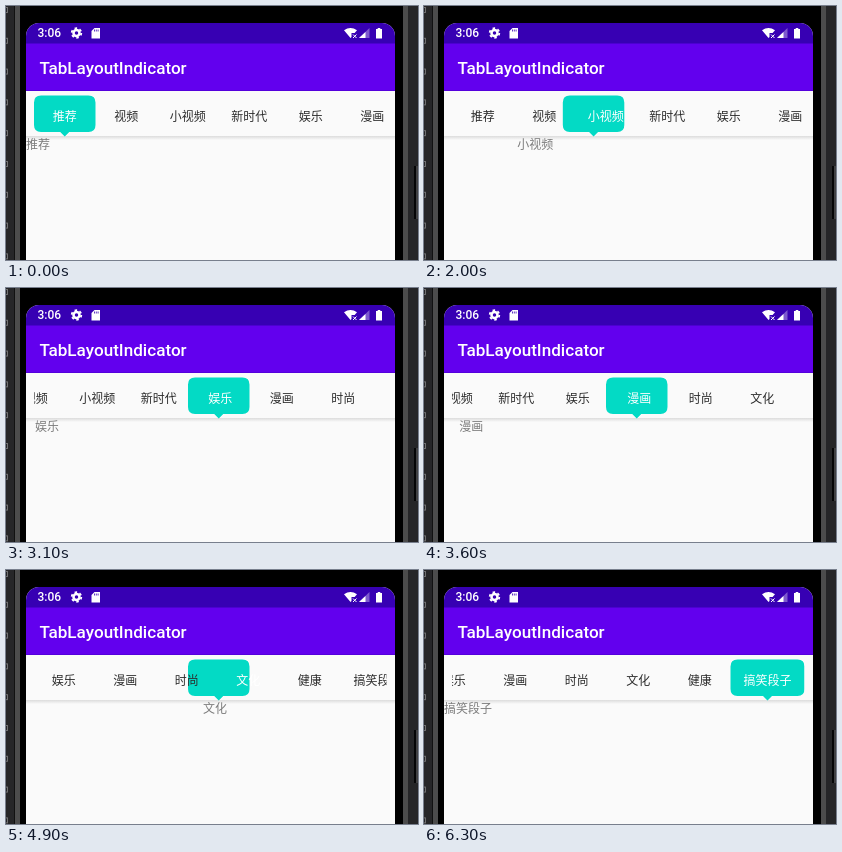
An HTML page for the animation above (7.4 s loop, 412 by 254 pixels).

```html
<!DOCTYPE html>
<html lang="zh-CN">
<head>
<meta charset="utf-8">
<style>
html, body { margin: 0; width: 100%; height: 100%; overflow: hidden; background: #262628; }
svg { display: block; width: 412px; height: 254px; }
text { font: 12px "Noto Sans CJK SC", "Noto Sans CJK", sans-serif; }
.latin { font-family: Roboto, sans-serif; font-weight: 500; fill: #fff; }
.title { font-size: 17.1px; }
#tabs text { text-anchor: middle; }
#pages text { fill: #7c7c7c; }
</style>
</head>
<body>
<svg viewBox="0 0 412 254">
  <defs>
    <clipPath id="screen"><path d="M20 254V30a13 13 0 0 1 13-13H376a13 13 0 0 1 13 13V254z"/></clipPath>
    <clipPath id="strip"><path d="M28 85H380.5V135H28z"/></clipPath>
    <linearGradient id="shade" x2="0" y2="1">
      <stop stop-color="#dcdcdc"/><stop offset="1" stop-color="#fafafa"/>
    </linearGradient>
    <pattern id="marks" width="4" height="30.8" patternUnits="userSpaceOnUse">
      <path d="M0 1.5H1.5V6.5H0" fill="none" stroke="#707072"/>
    </pattern>
  </defs>

  <!-- phone body -->
  <rect width="4" height="254" fill="url(#marks)"/>
  <rect x="8" width="394" height="254" fill="#111"/>
  <rect x="9" width="5" height="254" fill="#4c4c4c"/>
  <rect x="397" width="5" height="254" fill="#4c4c4c"/>
  <rect x="14" width="383" height="254" fill="#000"/>
  <rect x="408" y="160" width="2" height="53" fill="#050506"/>
  <rect x="410" y="160" width="2" height="53" fill="#404042"/>

  <g clip-path="url(#screen)">
    <rect x="20" y="17" width="369" height="237" fill="#fafafa"/>
    <rect x="20" y="17" width="369" height="68" fill="#3700b3"/>
    <rect x="20" y="37.5" width="369" height="47.2" fill="#6200ee"/>
    <rect x="20" y="130" width="369" height="4" fill="url(#shade)"/>

    <text class="latin" x="31.4" y="31.3">3:06</text>
    <circle cx="70.5" cy="27" r="3" fill="none" stroke="#fff" stroke-width="2.5"/>
    <circle cx="70.5" cy="27" r="4.8" fill="none" stroke="#fff" stroke-width="1.8" stroke-dasharray="2.5 2.53"/>
    <path d="M88.5 22H94V32.5H85.5V25z" fill="#fff"/>
    <path d="M88.5 23.5V25.5M90.3 23.5V25.5M92.1 23.5V25.5" stroke="#3700b3" stroke-width=".8"/>
    <path d="M338 24.3Q344.5 19.5 351 24.3L348.6 27H345.5V31L344.5 32z" fill="#fff"/>
    <path d="M347 28.5L350.5 32M350.5 28.5L347 32" stroke="#fff"/>
    <path d="M363.5 22V32H353z" fill="#fff" opacity=".35"/>
    <path d="M359.5 26V32H353z" fill="#fff"/>
    <path d="M370 23H371.7V22H374.3V23H376V32.5H370z" fill="#fff"/>
    <text class="latin title" x="33.5" y="67.6">TabLayoutIndicator</text>

    <g id="pages"></g>
    <g clip-path="url(#strip)">
      <path id="marker" fill="#03dac5"/>
      <g id="tabs"></g>
    </g>
  </g>
</svg>
<script>
const names = ['推荐', '视频', '小视频', '新时代', '娱乐', '漫画', '时尚', '文化', '健康', '搞笑段子'];
const left = 28, tabW = 61.5, lastW = 74, pageW = 369, middle = 212.75, maxScroll = 275;
const $ = id => document.getElementById(id);

const flick = u => 1 - (1 - u) ** 2.3;
const smooth = u => u * u * (3 - 2 * u);
const hold = u => u < .8 ? .523 - .004 * u : u < .95 ? .92 : 1;

// one entry per page: first step in ms, number of steps, easing
const swipes = [
  [700, 7, smooth], [1600, 7, smooth], [2300, 4, flick], [2800, 5, flick], [3400, 4, flick],
  [3800, 5, flick], [4400, 8, hold], [5500, 5, flick], [6000, 4, flick]
];

function addText(parent, str, y) {
  const el = document.createElementNS('http://www.w3.org/2000/svg', 'text');
  el.textContent = str;
  el.setAttribute('y', y);
  return $(parent).appendChild(el);
}
const tabs = names.map(n => addText('tabs', n, 115));
const pages = names.map(n => addText('pages', n, 143));

function position(t) {
  let p = 0;
  for (const [start, steps, ease] of swipes) {
    if (t >= start) p += ease(Math.min(1, (t - start + 100) / (steps * 100)));
  }
  return p;
}

function draw(t) {
  const p = position(Math.floor(t / 100) * 100);
  const w = tabW + (lastW - tabW) * Math.max(0, p - 8);
  const x = left + p * tabW;
  const scroll = Math.min(maxScroll, Math.max(0, x + w / 2 - middle));
  const mid = x + w / 2 - scroll;

  $('marker').setAttribute('d', `M${x - scroll + 7} 89.5h${w - 14}q7 0 7 7v22.5q0 7 -7 7
    H${mid + 4.5}L${mid} 130.5L${mid - 4.5} 126H${x - scroll + 7}q-7 0 -7 -7v-22.5q0 -7 7 -7z`);

  names.forEach((_, i) => {
    const width = i === 9 ? lastW : tabW;
    tabs[i].setAttribute('x', left + i * tabW + width / 2 - scroll);
    tabs[i].setAttribute('fill', i === Math.round(p) ? '#fff' : '#2c2c2c');
    pages[i].setAttribute('x', 20 + (i - p) * pageW);
  });
}

function tick() {
  draw(performance.now() % 7400);
  requestAnimationFrame(tick);
}
tick();
</script>
</body>
</html>
```
